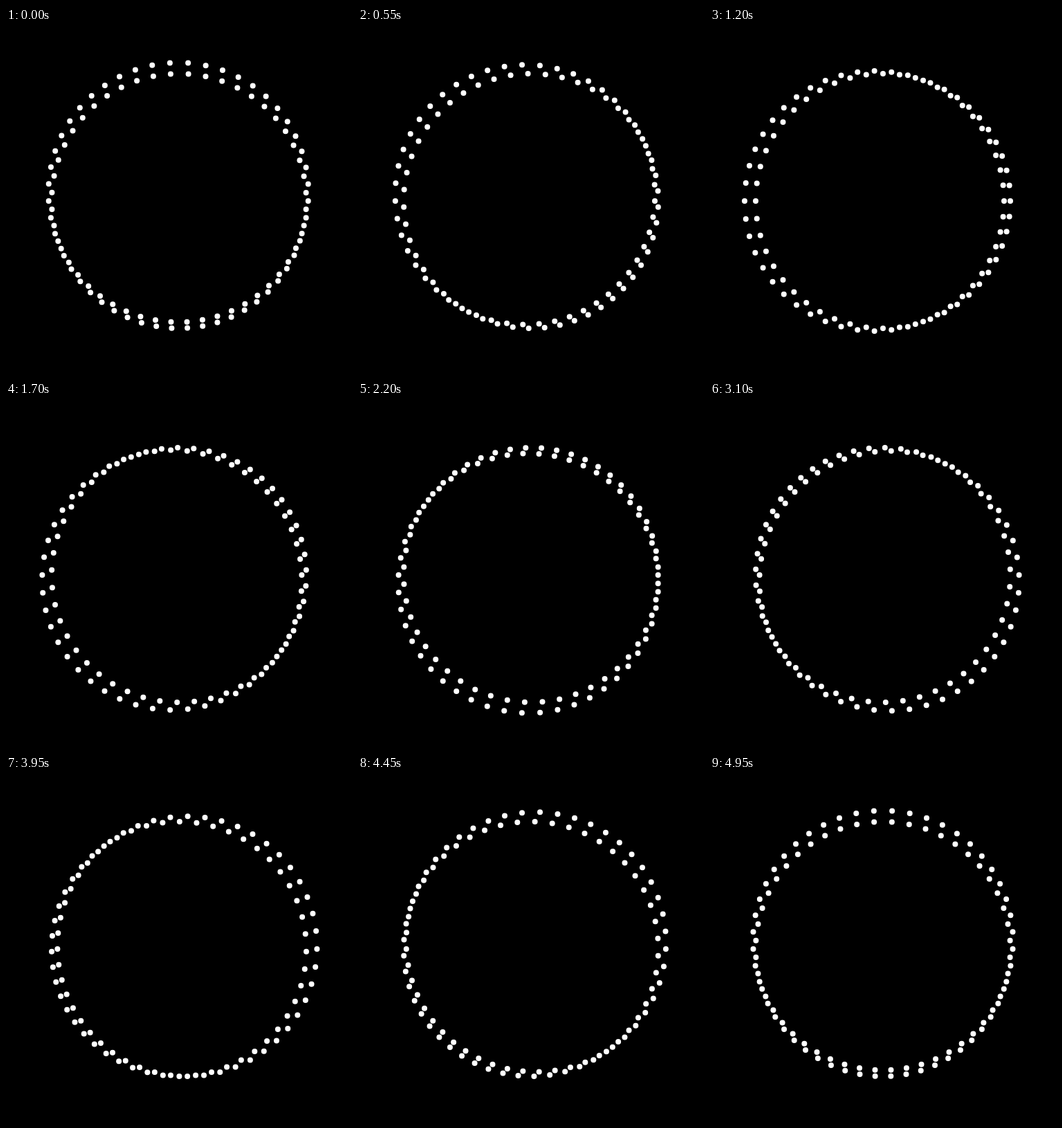
These frames come from a looping animation (500 px wide and 500 px high, 5000 ms). An HTML page with a canvas:

```html
<!DOCTYPE html>
<html lang="en">
<head>
<meta charset="utf-8">
<title>Dot rings</title>
<style>
  html, body { margin: 0; height: 100%; overflow: hidden; background: #000; }
  canvas { display: block; }
</style>
</head>
<body>
<canvas id="stage" width="500" height="500"></canvas>
<script>
const ctx = document.getElementById('stage').getContext('2d');
const TAU = Math.PI * 2;
const DOTS = 50, LOOP = 5000, STEP = 50;
const KAPPA = 0.5523; // handle length of a quarter-circle Bézier

// Point on a four-segment Bézier circle: turn 0 is left, 0.25 is top.
function circlePoint(turn) {
  const pos = ((turn % 1 + 1) % 1) * 4;
  const quarter = Math.floor(pos), t = pos - quarter, u = 1 - t;
  const a = u * u * u + 3 * u * u * t + 3 * u * t * t * KAPPA;
  const b = 3 * u * u * t * KAPPA + 3 * u * t * t + t * t * t;
  return [[-a, -b], [b, -a], [a, b], [-b, a]][quarter];
}

function dot(turn, radius) {
  const [x, y] = circlePoint(turn);
  ctx.beginPath();
  ctx.arc(250 + x * radius, 250 + y * radius, 4, 0, TAU);
  ctx.fill();
}

function draw(now) {
  const time = Math.floor(now / STEP + 0.02) * STEP;
  const crest = 0.25 - (time + STEP) / LOOP;
  ctx.fillStyle = '#000';
  ctx.fillRect(0, 0, 500, 500);
  ctx.fillStyle = '#fff';
  for (let i = 0; i < DOTS; i++) {
    const turn = i / DOTS;
    const phase = (turn - crest) * TAU;
    dot(turn, 187.5 + 12.5 * Math.cos(phase));      // swings in and out
    dot(turn + 0.5 / DOTS * Math.sin(phase), 184);  // swings along the ring
  }
  requestAnimationFrame(draw);
}
draw(0);
</script>
</body>
</html>
```
